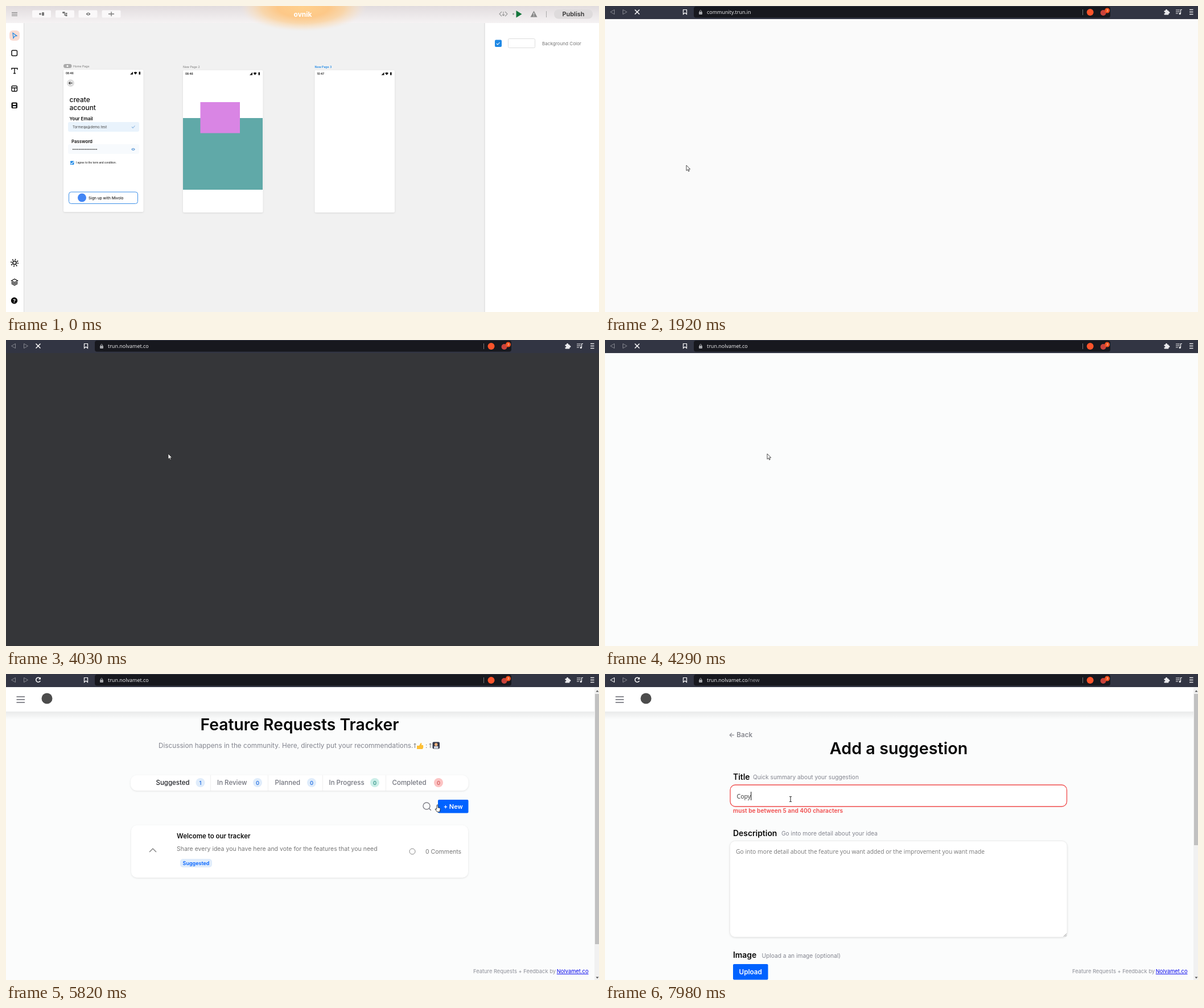
Animation of 1042x538 px, one loop 8000 ms. Source, as an HTML page:

```html
<!DOCTYPE html>
<html lang="en">
<head>
<meta charset="utf-8">
<title>Feedback walkthrough</title>
<style>
html, body { margin: 0; width: 100%; height: 100%; overflow: hidden; background: #fafafa; }
svg { display: block; width: 100vw; height: 100vh; }
.inter { font-family: Inter, sans-serif; }
.sans { font-family: "Liberation Sans", Arial, sans-serif; }
.open { font-family: "Open Sans", sans-serif; }
.b { font-weight: 700; } .s { font-weight: 600; } .m { font-weight: 500; }
.mid { text-anchor: middle; } .end { text-anchor: end; }
.shadow { filter: drop-shadow(0 1px 1.5px #0000001a); }
.round { stroke-linecap: round; }
</style>
</head>
<body>
<svg id="stage" viewBox="0 0 1042 538" preserveAspectRatio="none">
<defs>
<linearGradient id="bar" x2="0" y2="1"><stop stop-color="#e1dcde"/><stop offset="1" stop-color="#f5f2f3"/></linearGradient>
<radialGradient id="glow"><stop stop-color="#ffd08c"/><stop offset=".4" stop-color="#fdc888"/><stop offset=".65" stop-color="#fbd3a0" stop-opacity=".85"/><stop offset=".85" stop-color="#f8e0c4" stop-opacity=".5"/><stop offset="1" stop-color="#f4e8e0" stop-opacity="0"/></radialGradient>
<linearGradient id="fade" x2="0" y2="1"><stop stop-color="#000" stop-opacity=".07"/><stop offset="1" stop-color="#000" stop-opacity="0"/></linearGradient>
</defs>
</svg>
<script>
const BLUE = '#0073ff', ROYAL = '#0062ff';
const $ = id => document.getElementById(id);
const rect = (x, y, w, h, fill, more = '') => `<rect x="${x}" y="${y}" width="${w}" height="${h}" fill="${fill}" ${more}/>`;
const disc = (x, y, r, fill, more = '') => `<circle cx="${x}" cy="${y}" r="${r}" fill="${fill}" ${more}/>`;
const path = (d, stroke, width = 1, fill = 'none') => `<path d="${d}" stroke="${stroke}" stroke-width="${width}" fill="${fill}"/>`;
const fill = (d, color) => `<path d="${d}" fill="${color}"/>`;
const text = (s, x, y, size, color, cls = '', more = '') => `<text x="${x}" y="${y}" font-size="${size}" fill="${color}" class="${cls}" ${more}>${s}</text>`;
const group = (id, cls, ...parts) => `<g id="${id}" class="${cls}">${parts.flat().join('')}</g>`;
const search = (x, y, r, color) => disc(x, y, r, 'none', `stroke="${color}" stroke-width="1.4"`) + path(`M${x + r * .7} ${y + r * .7}l${r * .6} ${r * .6}`, color, 1.6);
const caretDown = (x, y) => fill(`M${x - 2.7} ${y - 1}h5.4l-2.7 3z`, '#777');
const scrollbar = (h, id) => rect(1034, 24, 8, 514, '#f1f1f1') + rect(1035, 35, 7, h, '#c1c1c1', id ? `id="${id}"` : '') +
  fill('M1036.5 31.5l2.5-3l2.5 3zM1036.5 532.5l2.5 3l2.5-3z', '#555');

// Design editor
const phone = (x, y, label, color, time) =>
  rect(x, y, 140.5, 250, '#fff', 'rx="2" class="shadow"') +
  text(label, label[0] === 'H' ? x + 17 : x, y - 4, 5.2, color, color === '#777' ? '' : 's') +
  text(time, x + 4, y + 7.5, 4.7, '#111', 's') +
  fill(`M${x + 117} ${y + 8.5}h5v-5z`, '#111') +
  fill(`M${x + 123.5} ${y + 5}q3-2.500 6 0l-3 3.600z`, '#111') + rect(x + 132.5, y + 3.5, 2.6, 5, '#111', 'rx=".5"');

const tools = [46, 87, 127.5, 168.5].map(x => rect(x, 7.5, 33, 13, '#faf8f9', 'rx="2"'));
const tick = (x, y, color) => path(`M${x - 2.5} ${y}l2 2 3.500-4`, color, 1.1);
const editor = group('editor', 'inter',
  rect(0, 0, 1042, 538, '#f1f1f1'), rect(0, 0, 1042, 30, 'url(#bar)'),
  '<ellipse cx="522" cy="3" rx="112" ry="42" fill="url(#glow)"/>',
  path('M10 11.5h10M10 14.2h10M10 17h10', '#777'), tools,
  path('M58 14h4M60 12v4M101 11.5h-2M103 12v4h4M180 14h10M185 10v8', '#777', 1.3),
  rect(63, 11, 4, 6, '#777', 'rx="1"'), fill('M99.5 10h4v3h-4zM104.5 12h3v2.5h-3zM104.5 15.5h3v2.5h-3z', '#777'),
  fill('M140.5 14q4-5 8 0q-4 5-8 0', '#777'), disc(144.5, 14, 1.2, '#fff'),
  text('ovnik', 521.5, 18.5, 12, '#fff', 'b mid'),
  path('M871 10l-4 4 4 4M877 10l4 4-4 4M874 10v7M872 15l2 2 2-2', '#999', 1.1),
  disc(891.5, 14, 1.5, '#999'), fill('M896.5 8v12.5l10-6.250z', '#14763c'),
  fill('M927.5 8.5l6 11h-12z', '#888'), path('M927.5 12v3.5M927.5 16.8v1.2', '#eee', 1.2),
  path('M949.5 9v11', '#aaa'), rect(963, 6, 68, 16.5, '#dedbdc', 'rx="8"'), text('Publish', 997, 18.3, 10.9, '#333', 's mid'),
  rect(0, 30, 31, 508, '#fff'), path('M31.5 30v508', '#ddd'),
  rect(6, 43, 18, 18, '#fadcd3', 'rx="6"'), path('M12 47.5l7 5-4 .7-2 3.300z', '#1e88e5', 1.2),
  rect(10, 78, 9.5, 9.5, 'none', 'rx="2" stroke="#111" stroke-width="1.5"'),
  path('M10 112v-2.500h10v2.500M15 109.5v9M13 118.5h4', '#111', 1.4),
  rect(10, 140.5, 9.5, 9.5, 'none', 'rx="2" stroke="#111" stroke-width="1.4"'), path('M10 144h9.500M14.7 144v6', '#111', 1.3),
  rect(9.5, 169.5, 10.5, 10.5, '#111', 'rx="2"'), rect(12, 171.5, 5.5, 2.5, '#fff'), rect(12, 176, 5.5, 2.5, '#fff'),
  disc(15, 451.5, 3, 'none', 'stroke="#111" stroke-width="1.6"'),
  disc(15, 451.5, 5.8, 'none', 'stroke="#111" stroke-width="2.6" stroke-dasharray="1.5 3.055"'),
  path('M9.5 483l5.5-3 5.5 3-5.5 3zM9.5 485.6l5.5 3 5.5-3M9.5 488l5.5 3 5.5-3', '#111', 1.3),
  disc(14.5, 518, 5.7, '#000'), text('?', 14.5, 521.5, 9, '#fff', 'b mid'),
  rect(841, 30, 201, 508, '#fff'), path('M841 30v508', '#d4d4d4'),
  rect(859, 59.5, 12, 12.5, '#1e88e5', 'rx="2"'), tick(864.5, 66, '#fff'),
  rect(882.5, 57.5, 47, 16, '#fff', 'rx="2" stroke="#ddd"'), text('Background Color', 942, 68.5, 8.1, '#777'),
  phone(101, 112, 'Home Page', '#777', '08:46'), rect(101, 102, 14.5, 7, '#aaa', 'rx="3.5"'), disc(108, 105.5, 1.5, '#fff'),
  disc(113.5, 135.5, 6.5, '#dedede'), path('M116.5 135.5h-6M113 133l-2.500 2.500 2.500 2.500', '#222'),
  text('create', 111.5, 168.5, 12, '#111', 'm'), text('account', 111.5, 183, 12, '#111', 'm'),
  text('Your Email', 111.5, 200.5, 8.1, '#111', 's'), rect(109, 204, 125, 17, '#e9f3fc', 'rx="3"'),
  text('Tormeqa@demo.test', 117, 215, 6.1, '#444'), tick(223.5, 212.5, '#8bb6e0'),
  text('Password', 115, 240.7, 7.8, '#111', 's'), rect(109, 243, 125, 17, '#f7fafd', 'rx="3"'),
  path('M117 252h43', '#333', 1.6).replace('/>', ' stroke-dasharray="1.7 1.05"/>'),
  fill('M220 252q3.500-4.500 7 0q-3.500 4.500-7 0', '#75a8dc'), disc(223.5, 252, 1, '#fff'),
  rect(113, 272.5, 6.5, 6.5, '#1e88e5', 'rx="1"'), tick(116, 275.7, '#fff'),
  text('I agree to the term and condition.', 123, 277.4, 4.5, '#222', 'm'),
  rect(110.5, 327, 121, 20.5, '#fff', 'rx="4" stroke="#3d8fe8"'), disc(133.5, 337, 7.5, '#4285f4'),
  text('Sign up with Mivolo', 145, 339.5, 6.6, '#222', 'm'),
  phone(311, 113, 'New Page 2', '#777', '08:46'), rect(311, 197, 140, 126, '#60a9a8'), rect(341.5, 169, 69.5, 54.5, '#d985e4'),
  phone(542.5, 113, 'New Page 3', '#1e88e5', '10:47'));

// Community page
const thumbs = ['#eadcec', '#77b5d6', '#ecd6d4', '#8d949e'].map((c, i) => {
  const y = 199 + i * 29.3;
  return rect(138, y, 16, 16, c, 'rx="2"') + fill(`M138 ${y + 12}l6-5 5 4 5-7v9l-2 3h-14z`, ['#d3b5dd', '#d5e8f0', '#d99a98', '#263140'][i]);
});
const barEnds = [863, 872, 877, 872, 863, 854, 850, 854, 863, 872];
const members = barEnds.map((end, i) => {
  const y = 152 + i * 30;
  return disc(742, y, 9.5, '#eaebec') + path(`M736 ${y + 6}l12-12`, '#fff', 1.8) +
    rect(756, y - 8, end - 756, 7.5, '#d1d2d5') + rect(756, y + 3, 41, 7, '#d1d2d5');
});
const card = (x, y, w, h) => rect(x, y, w, h, '#fff', 'rx="3" stroke="#ebebeb" class="shadow"');
const note = (s, x, y, cls = '', color = '#222') => text(s, x, y, 9.55, color, cls);
const hand = (fingers, palm, color) => group('', 'round', path(fingers, color, 10.5), fill(palm, color));
const hands = rect(280, 219, 423, 136, '#2166ff') +
  path('M468 225l6 10M508 224l-6 13M530 243l-14 6M449 249l12 7M444 287l12-1', '#d3e2ff', 1.3) +
  fill('M384 355q30-14 57-35l12 6 28 22v7z', '#fafbff') +
  hand('M470 270l2 30M481 246l2 54M493 241l2 59M505 247l-1 53', 'M466.5 292l43-4 6 42-18 18h-30q-9-8-6-24z', '#e77b70') +
  path('M478 297q11 9 9 28', '#ffc5b8', 1.6) +
  hand('M502 273l2 40M513 259l2 52M525 261l3 50M536 272l2 30', 'M499 303l43-8q4 26 12 39l-18 20q-32-5-37-33z', '#f3a091') +
  path('M508 268v35M519.5 262l1 40M531 267l2 34', '#e18478', 1) +
  fill('M445 327q10-7 19-1 18 4 19 18l-2 11h-34q-7-14-2-28', '#fff0ee') +
  fill('M533 355l17-24 14 5-13 19z', '#b7d3ff') + fill('M551 355l13-20q18 2 34 20z', '#0a1440');
const community = group('community', 'sans',
  rect(0, 24, 1042, 514, '#fafafa'), rect(0, 24, 1034, 26, '#fef1e2'), rect(0, 50, 1034, 35, '#fdfdfd'), path('M0 85.5h1034', '#ebebeb'),
  note('Platform', 142, 40, '', '#666'), note('Docs', 198, 40, '', '#666'), note('FeatureRequestTracker', 240, 40, '', '#666'),
  disc(156, 68, 14, '#000'),
  rect(195, 63.5, 10, 8, 'none', 'rx="1" stroke="#222"'), path('M193.5 65v6q0 1 2 1M197 66h2.500v2h-2.500zM201 66h3M201 68h3M197 70h7', '#222', .9),
  text('Home', 209.5, 71.5, 10.8, '#111', 'b'), rect(259.5, 54, 521, 27, '#fff', 'rx="2" stroke="#e8e8e8"'),
  note('Search in Trun...', 269, 71, '', '#b5b5b5'), search(768, 67, 3.5, '#aaa'),
  rect(795, 54, 55, 27, BLUE, 'rx="2"'), text('Login', 822.5, 71, 9.7, '#fff', 'b mid'), note('Sign Up', 861.5, 71, '', '#666'),
  rect(128.5, 102, 128, 21, '#fff', 'rx="2" stroke="#ececec"'),
  note('Your Feed', 138, 115.7), note('Groups', 138, 140.7), note('All Topics', 138, 165.7), path('M128 183.5h129', '#ddd'), thumbs,
  fill('M166 201c5 4 5 11 0 11s-5-5-2-7c1-1 2-2 2-4', '#b8441c'), disc(166, 209, 2.2, '#ffb53d'),
  rect(162.5, 232, 10, 7, '#eee', 'stroke="#666"'), path('M164 234.5h7M164 236.5h7', '#888', .8),
  fill('M162 262l7-2 4 9-7 2z', '#5d9fda'), disc(168, 266, 3, '#fff', 'stroke="#222"'),
  path('M163 291q4-3 5 0 1 2-3 4v2M165 299v1.500', '#8a3512', 2),
  note('Getting started', 174, 209.5), note('Keyboard short…', 176.5, 239), note('Widgets', 177, 268.5), note('Issues Tracker', 173, 297.5),
  rect(239, 289.5, 9.5, 9.5, '#fff', 'stroke="#555"'), path('M240 297l3-3 2 1 3-4', '#e04b3c'),
  card(279.5, 102, 423, 106), text('You have queries? Get in there.', 491, 142, 16.25, '#1b1b1b', 'b mid'),
  rect(290, 167, 192, 31, BLUE, 'rx="2"'), text('Login Now', 386, 187, 12.5, '#fff', 'b mid'),
  rect(501, 167.5, 191.5, 30, '#fff', `rx="2" stroke="${BLUE}"`), text('Sign Up Now', 597, 187, 12.3, BLUE, 'mid'),
  card(279.5, 219, 423, 274), hands, text('Welcome to your community', 366, 379, 16.35, '#1b1b1b', 'b'),
  `<g transform="rotate(-35 605 373)" class="round">${rect(599, 368, 13, 13, '#ffb636', 'rx="5" stroke="#3a2a12"')}${path('M601 371v-5M604.5 370v-7M608 370v-7M611 372v-6', '#3a2a12', 4.2)}${path('M601 372v-6M604.5 372v-9M608 372v-9M611 373v-7', '#ffb636', 2.8)}</g>`,
  path('M597 369q0-4 4-5M614 376q0 5-4 6', '#333', 1.2),
  note('<tspan class="b">Queries and discussions related to Trun are found here.</tspan> Powered by the official team and', 289.5, 403.5),
  note('people like you.', 289.5, 416.3), note('PS: Trun is giving out invites from 20th Aug.', 289.5, 438.5, 'b'),
  rect(430.5, 456, 119, 28, BLUE, 'rx="2"'), text('Get early access', 490, 473.5, 10.9, '#fff', 'b mid'),
  note('Recent Activity', 282.5, 520.7, '', '#999'), caretDown(356, 517), note('All Types', 371.5, 520.7, '', '#999'), caretDown(421, 517),
  rect(668, 511, 12.5, 12.5, '#df771f', 'rx="1"'), disc(671, 520.5, 1.2, '#fff'),
  path('M670 516.5a5 5 0 0 1 5 5M670 513.5a8 8 0 0 1 8 8', '#fff', 1.3), caretDown(696, 517),
  card(722.5, 102, 177, 342), note('Most Reputable Users', 732.5, 120, 'b'), path('M723 132.5h177', '#e8e8e8'), members,
  path('M722 454.5h178', '#ddd'), rect(778, 467.5, 8, 8, '#666'), rect(822.5, 467.5, 8, 8, '#666'),
  ['Contact Us', 'Privacy Policy', 'Feature Request'].map((s, i) => text(s, 811, 494.5 + i * 16.6, 8.15, '#777', 'mid')),
  scrollbar(68));

// Feature request tracker
const menu = path('M18.5 40h14.500M18.5 45h14.500M18.5 50h14.500', '#8a8b92', 2.2);
const footer = text('Feature Requests + Feedback by', 966, 526, 9.35, '#8d8f98', 'end') +
  text('Nolvamet.co', 1023.5, 526, 9.35, '#0000ee', 'end', 'text-decoration="underline"');
const pageTop = h => rect(0, 24, 1034, h, '#fff') + rect(0, 24 + h, 1034, 14, 'url(#fade)');
const tab = (label, count, x, badgeX, color, badge) =>
  text(label, x, 195, 11.5, x < 300 ? '#24262b' : '#73757e', 'm') + disc(badgeX, 191, 8, badge) + text(count, badgeX, 194.5, 9.5, color, 'm mid');
const logo = disc(72, 43, 9.5, '#4c4c4c');
const tracker = group('tracker', 'inter',
  rect(0, 24, 1042, 514, '#fbfcfc'), group('smallTop', '', pageTop(16)), group('fullTop', '', pageTop(42), logo), menu,
  text('Feature Requests Tracker', 516, 98.5, 28.25, '#060606', 's mid'),
  text('Discussion happens in the community. Here, directly put your recommendations.', 268, 129.5, 11.75, '#83858f'),
  path('M718.5 130v-8M716.5 124l2-2 2 2M745.5 130v-8M743.5 124l2-2 2 2', '#777'), text(':', 737, 129.5, 11.6, '#83858f'),
  fill('M722 126h4l3-5q2 0 1 4h3q1 4-1 7h-10z', '#fdbf35'), rect(749.5, 119.5, 12.5, 12, '#34384a', 'rx="2"'),
  disc(755.7, 124, 2.7, '#f2b27c'), rect(752, 127, 7.5, 4, '#cfd4df'),
  rect(219, 178, 593.5, 27, '#fff', 'rx="11" class="shadow"'), path('M359.5 178v27M460.5 178v27M556.5 178v27M667.5 178v27', '#efefef'),
  tab('Suggested', 1, 263.5, 341.5, '#1466e0', '#dfecfb'), tab('In Review', 0, 371, 442, '#1466e0', '#dfecfb'),
  tab('Planned', 0, 472.5, 537, '#1466e0', '#dfecfb'), tab('In Progress', 0, 567.5, 648, '#2b8f80', '#cbeee8'), tab('Completed', 0, 678.5, 760, '#cf5555', '#fcc3c3'),
  search(739, 232, 6, '#808189'), rect(759, 221, 53.5, 23.5, ROYAL, 'rx="2"'), text('+ New', 785.7, 236.5, 11, '#fff', 's mid'),
  group('idea', '', rect(220, 266, 592, 92, '#fff', 'rx="10" class="shadow"'), path('M252 313l6-6 6 6', '#888', 1.5),
    text('Welcome to our tracker', 300, 289, 11.5, '#111', 's'), text('Share every idea you have here and vote for the features that you need', 300, 311, 10.5, '#777'),
    rect(306, 325, 56, 15, '#dfecfb', 'rx="5"'), text('Suggested', 334, 336, 9, ROYAL, 's mid'),
    disc(714, 312, 5, 'none', 'stroke="#888"'), text('0 Comments', 737, 316, 10.5, '#777')),
  footer, scrollbar(440));

// Suggestion form
const heading = (label, hint, hintX, y) => text(label, 225, y, 13.9, '#080808', 's') + text(hint, hintX, y - .5, 10.2, '#83858f');
const form = group('form', 'inter',
  rect(0, 24, 1042, 514, '#fbfcfc'), pageTop(42), menu, logo,
  text('← Back', 259, 111, 11.6, '#85868d', 's end'), text('Add a suggestion', 516, 141, 28.8, '#060606', 's mid'),
  heading('Title', 'Quick summary about your suggestion', 260, 185.5),
  group('emptyField', 'open', rect(219.5, 194.5, 592.5, 36.5, '#fff', 'rx="9" stroke="#ececec" class="shadow"'), text('Title', 230, 217, 10.3, '#777')),
  group('errorField', 'open', rect(220, 195, 591.5, 38, '#fff', 'rx="9" stroke="#f04b4b" stroke-width="1.3"')),
  text('', 231.5, 218.5, 10.6, '#333', 'open', 'id="typed"'), rect(230, 205, 1, 15, '#111', 'id="caret"'),
  group('error', '', text('must be between 5 and 400 characters', 225, 244, 10.2, '#f04b4b', 's')),
  group('lower', '', heading('Description', 'Go into more detail about your idea', 310, 267.5),
    rect(219.5, 276.5, 592.5, 169, '#fff', 'rx="9" stroke="#ececec" class="shadow"'),
    text('Go into more detail about the feature you want added or the improvement you want made', 230, 299, 10.35, '#777', 'open'),
    path('M806 444.5l5-5M809 444.5l2-2', '#777', .8),
    heading('Image', 'Upload a an image (optional)', 275.5, 482),
    rect(225, 493, 61.5, 27.5, ROYAL, 'rx="2"'), text('Upload', 255.7, 511, 11.7, '#fff', 's mid')),
  footer, scrollbar(271, 'thumb'));

const chrome = group('chrome', 'open',
  rect(0, 0, 1042, 23, '#323543'), rect(156, 1, 732, 19.5, '#17181e', 'rx="4"'),
  '<path id="back" d="M16.5 6.5v8l-7-4z" fill="none"/>', path('M31.5 6.5v8l7-4z', '#85878f'),
  group('stop', '', path('M52.5 6.5l8 8M60.5 6.5l-8 8', '#fff', 1.5)),
  group('reload', '', path('M60 8a4 4 0 1 0 .3 4', '#fff', 1.5), fill('M61 5.5v4h-4z', '#fff')),
  path('M137.5 6.5h6v8l-3-2.500-3 2.500z', '#fff', 1.2),
  group('site', '', rect(165, 10, 6, 5, '#a5a6aa', 'rx="1"'), path('M166.5 10v-1.500q1.500-2.500 3 0v1.500', '#a5a6aa'),
    text('', 179, 14.3, 9, '#f3f3f4', '', 'id="address"'), path('M839.5 6v10', '#777'), disc(852.5, 11, 6, '#fb542b')),
  disc(875.5, 12, 5, '#c9433c'), disc(882.5, 8, 4.5, '#f4511e'), text('3', 882.5, 10.3, 6, '#fff', 'mid'),
  rect(982.5, 8, 8, 7.5, '#e9e9ec', 'rx="1"'), disc(986.5, 7.5, 1.7, '#e9e9ec'), disc(990.7, 11.5, 1.7, '#e9e9ec'), disc(983, 11.7, 1.3, '#323543'),
  path('M1003 7h7M1003 10h7M1003 13h4M1011.5 13.5v-7h2.500', '#e9e9ec', 1.2), disc(1010.2, 13.5, 1.7, '#e9e9ec'),
  path('M1027 6.5h6.500M1027 10.5h6.500M1027 14.5h6.500', '#e9e9ec', 1.3));

const pointer = group('pointer', '',
  group('arrow', '', path('M0 0v9.500l2.200-2 1.500 3.300 1.500-.7-1.500-3.200h3z', '#222', .8, '#fff')),
  group('hand', '', path('M-1 0q1-1 2 0v4.500l3 .5q1 .5 1 2l-1 5h-4.500l-3.500-4.500q0-2 2.500 0z', '#222', .9, '#fff')),
  group('beam', '', path('M-2-4.500h1.500l.5.7.5-.7h1.500M0-4v8M-2 4.500h1.500l.5-.7.5.7h1.500', '#222', 1)));

$('stage').insertAdjacentHTML('beforeend', rect(0, 0, 1042, 538, '#fafafa', 'id="blank"') + editor + community + tracker + form + chrome + pointer);

const moves = [
  [270, 112, 497], [900, 14, 515], [1100, 14, 515], [1700, 143, 280], [2580, 143, 280], [3340, 283, 31],
  [3540, 283, 31], [4030, 285, 200], [4290, 285, 200], [5050, 307, 204], [5470, 307, 204], [5880, 785, 232],
  [6220, 785, 232], [6600, 770, 262], [6770, 770, 262], [7180, 360, 205], [7450, 360, 205], [7650, 350, 184], [7950, 326, 220]];

function position(t) {
  const next = moves.findIndex(m => m[0] > t);
  if (next === 0) return moves[0].slice(1);
  if (next < 0) return moves.at(-1).slice(1);
  const [t0, x0, y0] = moves[next - 1], [t1, x1, y1] = moves[next];
  const p = (t - t0) / (t1 - t0), k = p * p * (3 - 2 * p);
  return [x0 + (x1 - x0) * k, y0 + (y1 - y0) * k];
}
const show = (id, on) => $(id).style.display = on ? '' : 'none';
const within = (t, a, b) => t >= a && t < b;

function draw(t) {
  show('editor', t < 1570);
  show('chrome', t >= 1570);
  show('community', within(t, 2250, 3610));
  show('tracker', within(t, 4430, 6220));
  show('form', t >= 6220);
  const dark = within(t, 1570, 1850) || within(t, 3610, 4150);
  $('blank').setAttribute('fill', dark ? '#353639' : t < 4000 ? '#fafafa' : '#fbfcfc');

  show('site', within(t, 1920, 3610) || t >= 3960);
  $('address').innerHTML = t < 3610 ? 'community.trun.in' : 'trun.nolvamet.co' + (t >= 6220 ? '<tspan fill="#a0a1a6">/new</tspan>' : '');
  $('back').setAttribute('stroke', t >= 6220 ? '#fff' : '#85878f');
  show('stop', t < 4430);
  show('reload', t >= 4430);

  show('smallTop', t < 5540);
  show('fullTop', t >= 5540);
  const zoom = Math.min(1, Math.max(0, (t - 5330) / 432));
  $('idea').setAttribute('transform', `translate(516 312) scale(${zoom}) translate(-516 -312)`);

  const word = 'Copy'.slice(0, [7110, 7520, 7660, 7870].filter(at => t >= at).length);
  const invalid = word !== '';
  show('emptyField', !invalid);
  show('errorField', invalid);
  show('error', invalid);
  $('lower').setAttribute('transform', `translate(0 ${invalid ? 17 : 0})`);
  $('thumb').setAttribute('height', invalid ? 266 : 271);
  $('typed').textContent = word;
  $('caret').setAttribute('x', invalid ? 231.5 + $('typed').getComputedTextLength() : 230);
  $('caret').setAttribute('y', invalid ? 207 : 205);

  const pointing = within(t, 5050, 5470) || within(t, 5810, 6220), beam = t >= 7110;
  show('pointer', t >= 270);
  show('hand', pointing);
  show('beam', beam);
  show('arrow', !pointing && !beam);
  $('pointer').setAttribute('transform', `translate(${position(t)})`);
}

const start = performance.now();
function loop() {
  draw((performance.now() - start) % 8000);
  requestAnimationFrame(loop);
}
loop();
</script>
</body>
</html>
```
